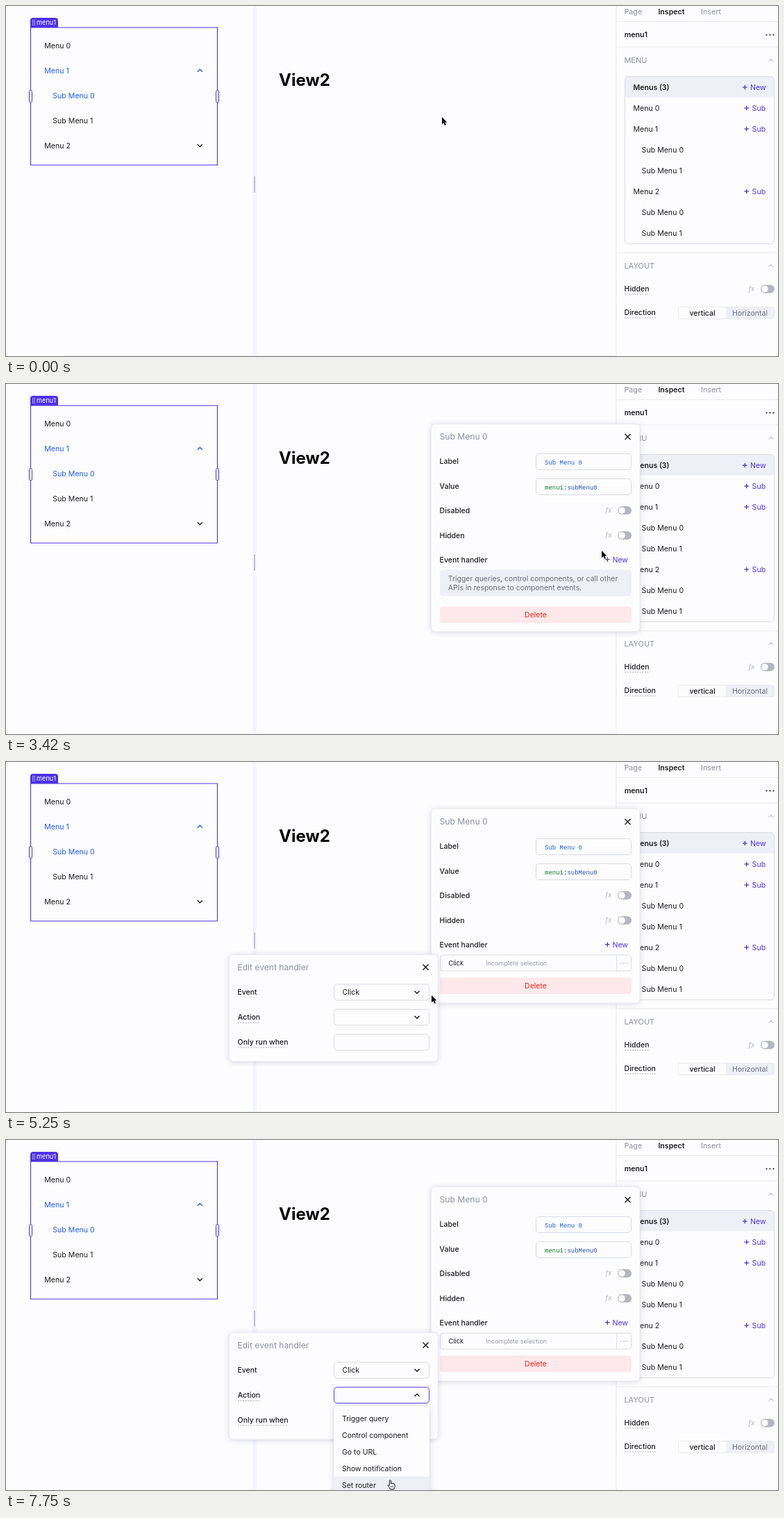
Animation of 1112 by 504 pixels, one loop 8000 ms. Source, as an HTML page with a canvas:

```html
<!DOCTYPE html>
<html lang="en">
<head>
<meta charset="utf-8">
<title>Menu editor</title>
<style>
html, body { margin: 0; width: 100%; height: 100%; overflow: hidden; background: #fdfdff; }
canvas { display: block; width: 1112px; height: 504px; }
</style>
</head>
<body>
<canvas id="stage"></canvas>
<script>
const W = 1112, H = 504, LOOP = 8000, STEP = 1000 / 12;
const canvas = document.getElementById('stage');
const ctx = canvas.getContext('2d');
const ratio = window.devicePixelRatio || 1;
canvas.width = W * ratio;
canvas.height = H * ratio;

const SANS = 'Inter, sans-serif';
const MONO = '"Liberation Mono", monospace';
const BG = '#fdfdff', INK = '#1c1c1f', GRAY = '#8d90a0', VIOLET = '#4d32e6', BLUE = '#1f5cf5';
const LINE = '#ebebf3', EDGE = '#d8dae5', TINT = '#efeff8';

// Pointer path: step, x, y
const PATH = [
  [0, 628, 160], [2, 566, 172], [4, 410, 181], [6, 280, 152], [8, 250, 127],
  [15, 250, 127], [16, 250.5, 126], [18, 340, 184], [20, 570, 262], [22, 850, 252], [24, 952, 214],
  [27, 952, 214], [28, 947, 212], [29, 943.5, 211], [32, 858, 190],
  [33, 858, 190], [36, 836, 150], [38, 836, 152], [41, 858, 240], [43, 873, 270],
  [47, 880, 258], [48, 880, 258], [49, 880, 259], [54, 804, 287],
  [59, 804, 287], [61, 710, 305], [63, 613, 336], [66, 562, 366],
  [74, 562, 366], [78, 566, 405], [81, 564, 430], [84, 563.5, 430.5], [93, 553.5, 490]
];
const ARROW = new Path2D('M0 0V10.4L2.4 8.1 4 11.9 5.9 11.1 4.3 7.4H7.4Z');
const HAND = new Path2D('M-1.2 7V.8a1.1 1.1 0 0 1 2.2 0V5a1 1 0 0 1 2 .2 1 1 0 0 1 2 .4 1 1 0 0 1 1.6.6V9c0 2-1 2.4-1.2 3.8H-.3C-.6 11-2 10-3.2 8.2-3.8 7-2.4 6.2-1.2 7.6Z');
const BEAM = new Path2D('M-2-5Q0-5 0-3.5Q0-5 2-5M0-3.5V3.5M-2 5Q0 5 0 3.5Q0 5 2 5');

const inside = (p, x, y, w, h) => p.x >= x && p.x < x + w && p.y >= y && p.y < y + h;

function pointerAt(step) {
  let i = 0;
  while (i < PATH.length - 2 && PATH[i + 1][0] <= step) i++;
  const [s0, x0, y0] = PATH[i], [s1, x1, y1] = PATH[i + 1];
  const k = Math.min(1, (step - s0) / (s1 - s0));
  return { x: x0 + (x1 - x0) * k, y: y0 + (y1 - y0) * k };
}

// y is the middle of the capitals
function text(str, x, y, { size = 10.6, color = INK, weight = 400, align = 'left', font = SANS, style = '' } = {}) {
  ctx.font = `${style} ${weight} ${size}px ${font}`;
  ctx.fillStyle = color;
  ctx.textAlign = align;
  ctx.fillText(str, x, y + size * 0.364);
}

function box(x, y, w, h, r, fill, stroke, width = 1) {
  ctx.beginPath();
  ctx.roundRect(x, y, w, h, r);
  if (fill) { ctx.fillStyle = fill; ctx.fill(); }
  if (stroke) { ctx.strokeStyle = stroke; ctx.lineWidth = width; ctx.stroke(); }
}

function rect(x, y, w, h, color) {
  ctx.fillStyle = color;
  ctx.fillRect(x, y, w, h);
}

function poly(points, color, width = 1.4) {
  ctx.beginPath();
  points.forEach(([x, y]) => ctx.lineTo(x, y));
  ctx.strokeStyle = color;
  ctx.lineWidth = width;
  ctx.stroke();
}

function chevron(x, y, up, color = INK, r = 3.5, width = 1.5) {
  const d = up ? r / 2 : -r / 2;
  poly([[x - r, y + d], [x, y - d], [x + r, y + d]], color, width);
}

function cross(x, y) {
  poly([[x - 4, y - 4], [x + 4, y + 4]], INK);
  poly([[x + 4, y - 4], [x - 4, y + 4]], INK);
}

function plusText(label, px, tx, y) {
  poly([[px, y], [px + 6.6, y]], VIOLET, 1.3);
  poly([[px + 3.3, y - 3.3], [px + 3.3, y + 3.3]], VIOLET, 1.3);
  text(label, tx, y, { color: VIOLET });
}

function dots(x, y, gap, r, color) {
  ctx.fillStyle = color;
  for (let i = -1; i < 2; i++) {
    ctx.beginPath();
    ctx.arc(x + i * gap, y, r, 0, 7);
    ctx.fill();
  }
}

function toggle(x, y) {
  text('fx', x - 17.5, y, { size: 9.6, color: '#b4b6c0', style: 'italic' });
  box(x, y - 6, 20, 12, 6, '#b3b6c2');
  ctx.beginPath();
  ctx.arc(x + 6, y, 4.8, 0, 7);
  ctx.fillStyle = '#fff';
  ctx.fill();
}

function dashed(x0, x1, y) {
  ctx.setLineDash([2, 1.6]);
  poly([[x0, y], [x1, y]], '#a9acba', 1);
  ctx.setLineDash([]);
}

function card(x, y, w, h, r) {
  ctx.save();
  ctx.shadowColor = 'rgba(50,50,100,.2)';
  ctx.shadowBlur = 9 * ratio;
  ctx.shadowOffsetY = ratio;
  box(x, y, w, h, r, BG);
  ctx.restore();
  box(x, y, w, h, r, null, '#e9e9f2', 0.8);
}

const field = (x, y, active) => box(x + 0.5, y + 0.5, 137, 23, 4.5, BG, active ? VIOLET : EDGE);
const label = (str, x, y) => text(str, x, y, { size: 10.5, weight: 500 });

function drawMenu(p) {
  rect(355, 0, 6, H, '#f5f5fd');
  box(357, 245, 2, 24, 1, '#bfc2ce');
  rect(83, 503, 796, 1, '#f1f1fb');
  text('View2', 393, 106, { size: 24, weight: 700, color: '#000' });

  for (const y of [39, 75, 111, 147, 183])
    if (inside(p, 36, y, 268, 36)) rect(36, y, 268, 36, TINT);

  text('Menu 0', 55.2, 57);
  text('Menu 1', 55.2, 93, { color: BLUE });
  text('Sub Menu 0', 67.3, 129, { color: BLUE });
  text('Sub Menu 1', 67.3, 165);
  text('Menu 2', 55.2, 201);
  chevron(279.3, 93, true, BLUE);
  chevron(279.3, 201, false);

  box(35.5, 31, 269, 198, 0, null, VIOLET, 1.1);
  box(35, 17, 40, 14, [4, 4, 0, 0], VIOLET);
  text('menu1', 44, 24, { size: 9.2, color: '#fff' });
  for (let i = 0; i < 8; i++) rect(38 + (i % 2) * 2.6, 20 + (i >> 1) * 2.2, 1.2, 1.2, '#e4e0ff');
  for (const x of [35.5, 304.5]) box(x - 2, 121.5, 4, 17.5, 2, '#fff', VIOLET);
}

function drawInspector() {
  rect(879, 0, 233, H, BG);
  rect(878.5, 0, 1, H, '#e7e7f6');
  text('Page', 890.4, 8, { size: 10.8, color: GRAY });
  text('Inspect', 939.4, 8, { size: 10.6, weight: 600 });
  text('Insert', 1001, 8, { size: 10.8, color: GRAY });
  for (const y of [22, 58.5, 355]) rect(880, y, 232, 1, LINE);
  text('menu1', 890.8, 41, { weight: 600 });
  dots(1100.5, 41.5, 5, 1.1, INK);
  text('MENU', 890.4, 77.5, { size: 11, color: GRAY });
  chevron(1102, 78, true, GRAY, 3, 1);

  box(891.5, 101.5, 215, 241, 5, BG);
  box(891.5, 101.5, 215, 30, [5, 5, 0, 0], TINT);
  box(891.5, 101.5, 215, 241, 5, null, EDGE);
  text('Menus (3)', 903.4, 117, { weight: 600 });
  plusText('New', 1061, 1072, 117);
  ['Menu 0', 'Menu 1', 'Sub Menu 0', 'Sub Menu 1', 'Menu 2', 'Sub Menu 0', 'Sub Menu 1'].forEach((name, i) => {
    const y = 147 + i * 30, sub = name.startsWith('Sub');
    text(name, sub ? 915.6 : 903.4, y);
    if (!sub) plusText('Sub', 1063.4, 1074.6, y);
  });

  text('LAYOUT', 890.4, 373.5, { size: 11, color: GRAY });
  chevron(1102, 374, true, GRAY, 3, 1);
  label('Hidden', 890.6, 407.5);
  dashed(891, 927, 415);
  toggle(1087, 407.5);
  label('Direction', 890.6, 441.5);
  dashed(891, 937, 449);
  box(968.5, 433.5, 138, 17, 3, TINT, LINE);
  box(969, 434, 68, 16, 3, BG);
  text('vertical', 1003, 442, { size: 10.5, weight: 500, align: 'center' });
  text('Horizontal', 1071.5, 442, { color: '#6d7080', align: 'center' });
}

function drawItemPanel(p, step) {
  if (step < 28) return;
  const added = step >= 49, top = added ? 67 : 57;
  ctx.globalAlpha = step < 29 ? 0.5 : 1;
  card(612.5, top + 0.5, 300.5, added ? 279.5 : 299, 6);
  text('Sub Menu 0', 624.6, top + 19, { size: 12.1, color: GRAY });
  cross(895.5, top + 19);

  label('Label', 624.6, top + 54);
  field(763, top + 43);
  text('Sub Menu 0', 776, top + 55.5, { size: 9, color: '#1f5fc4', font: MONO });
  label('Value', 624.6, top + 90);
  field(763, top + 79, inside(p, 763, top + 79, 138, 24));
  text('menu1', 776, top + 91.5, { size: 9, color: '#187a2c', font: MONO });
  text(':', 803, top + 91.5, { size: 9, font: MONO });
  text('subMenu0', 808.4, top + 91.5, { size: 9, color: '#1f4fae', font: MONO });
  label('Disabled', 624.6, top + 125);
  toggle(881, top + 125);
  label('Hidden', 624.6, top + 161);
  toggle(881, top + 161);

  label('Event handler', 624.6, top + 195.7);
  if (inside(p, 856, top + 186, 45, 20)) box(856, top + 186.5, 45, 18, 4, '#dcdee9');
  plusText('New', 863, 873.4, top + 195.7);

  if (added) {
    box(625.5, top + 211, 275, 23, 4, BG, EDGE);
    rect(879, top + 211, 1, 23, EDGE);
    text('Click', 637.6, top + 222.7, { size: 9.2 });
    text('Incomplete selection', 691, top + 222.7, { size: 9, color: '#9a9da9' });
    dots(890, top + 222.7, 4.2, 0.8, '#a4a7b3');
  } else {
    box(625, top + 210.5, 276, 38, 5, TINT);
    text('Trigger queries, control components, or call other', 636.8, top + 223.5, { size: 10.45, color: '#6c6f7c' });
    text('APIs in response to component events.', 636.8, top + 236.3, { size: 10.45, color: '#6c6f7c' });
  }
  const y = top + (added ? 243 : 263);
  box(625, y + 0.5, 276, 23.5, 4, '#fee8ea');
  text('Delete', 763, y + 12.3, { size: 10.5, color: '#e3241c', align: 'center' });
  ctx.globalAlpha = 1;
}

function drawEventPanel(p, step) {
  if (step < 56) return;
  ctx.globalAlpha = [0.45, 0.85][step - 56] || 1;
  card(321.5, 277.5, 300.5, 153.5, 6);
  text('Edit event handler', 333.4, 296, { size: 12.1, color: GRAY });
  cross(604.5, 295.5);
  label('Event', 333.4, 331.5);
  field(472, 319.5, inside(p, 472, 319.5, 138, 24));
  text('Click', 484.4, 331.5);
  chevron(592, 331.5, false);
  label('Action', 333.8, 367.5);
  dashed(334, 366, 375.5);
  field(472, 355.5, step >= 68 || inside(p, 472, 355.5, 138, 24));
  chevron(592, 367.5, step >= 69);
  label('Only run when', 333.6, 403);
  dashed(334, 406, 411);
  field(472, 391.5);
  ctx.globalAlpha = 1;
}

function drawDropdown(p, step) {
  if (step < 69) return;
  const k = [0.35, 0.75][step - 69] || 1;
  ctx.save();
  ctx.globalAlpha = k;
  ctx.translate(0, 382);
  ctx.scale(1, 0.8 + 0.2 * k);
  ctx.translate(0, -382);
  card(472, 382.5, 138, 180, 4);
  const active = p.y < 388.5 ? 0 : Math.floor((p.y - 388.5) / 24);
  rect(472, 388.5 + active * 24, 138, 24, TINT);
  ['Trigger query', 'Control component', 'Go to URL', 'Show notification', 'Set router', 'Log out'].forEach((name, i) =>
    text(name, 484, 400.7 + i * 24, { size: 10.5 }));
  ctx.restore();
}

function pointerShape(p, step) {
  const panel = step >= 28 && inside(p, 612, 57, 301, 299);
  if (panel) {
    const top = step >= 49 ? 67 : 57;
    if (inside(p, 763, top + 79, 138, 24)) return BEAM;
    if (inside(p, 856, top + 186, 45, 22)) return HAND;
    return step >= 49 && inside(p, 625, 278, 276, 24) ? HAND : ARROW;
  }
  const overMenu = inside(p, 36, 39, 268, 180);
  const overList = inside(p, 892, 132, 214, 210);
  const overSelect = step >= 56 && inside(p, 472, 355, 138, 149);
  return overMenu || overList || overSelect ? HAND : ARROW;
}

function drawPointer(p, step) {
  const shape = pointerShape(p, step);
  ctx.save();
  ctx.translate(p.x, p.y);
  ctx.lineJoin = 'round';
  if (shape === ARROW) {
    ctx.strokeStyle = '#fff';
    ctx.lineWidth = 1.6;
    ctx.stroke(shape);
    ctx.fillStyle = '#000';
    ctx.fill(shape);
  } else {
    ctx.strokeStyle = '#111';
    ctx.lineWidth = 1;
    if (shape === HAND) {
      ctx.fillStyle = '#fff';
      ctx.fill(shape);
    }
    ctx.stroke(shape);
    if (shape === HAND)
      for (const x of [0.9, 2.5, 4.1]) poly([[x, 8], [x, 10.6]], '#333', 0.7);
  }
  ctx.restore();
}

function draw(time) {
  const step = Math.floor((time % LOOP + 3.4) / STEP) % 96;
  const p = pointerAt(step);
  ctx.setTransform(ratio, 0, 0, ratio, 0, 0);
  rect(0, 0, W, H, BG);
  drawMenu(p);
  drawInspector();
  drawItemPanel(p, step);
  drawEventPanel(p, step);
  drawDropdown(p, step);
  drawPointer(p, step);
}

const start = performance.now();
function loop() {
  draw(performance.now() - start);
  requestAnimationFrame(loop);
}
loop();
</script>
</body>
</html>
```
